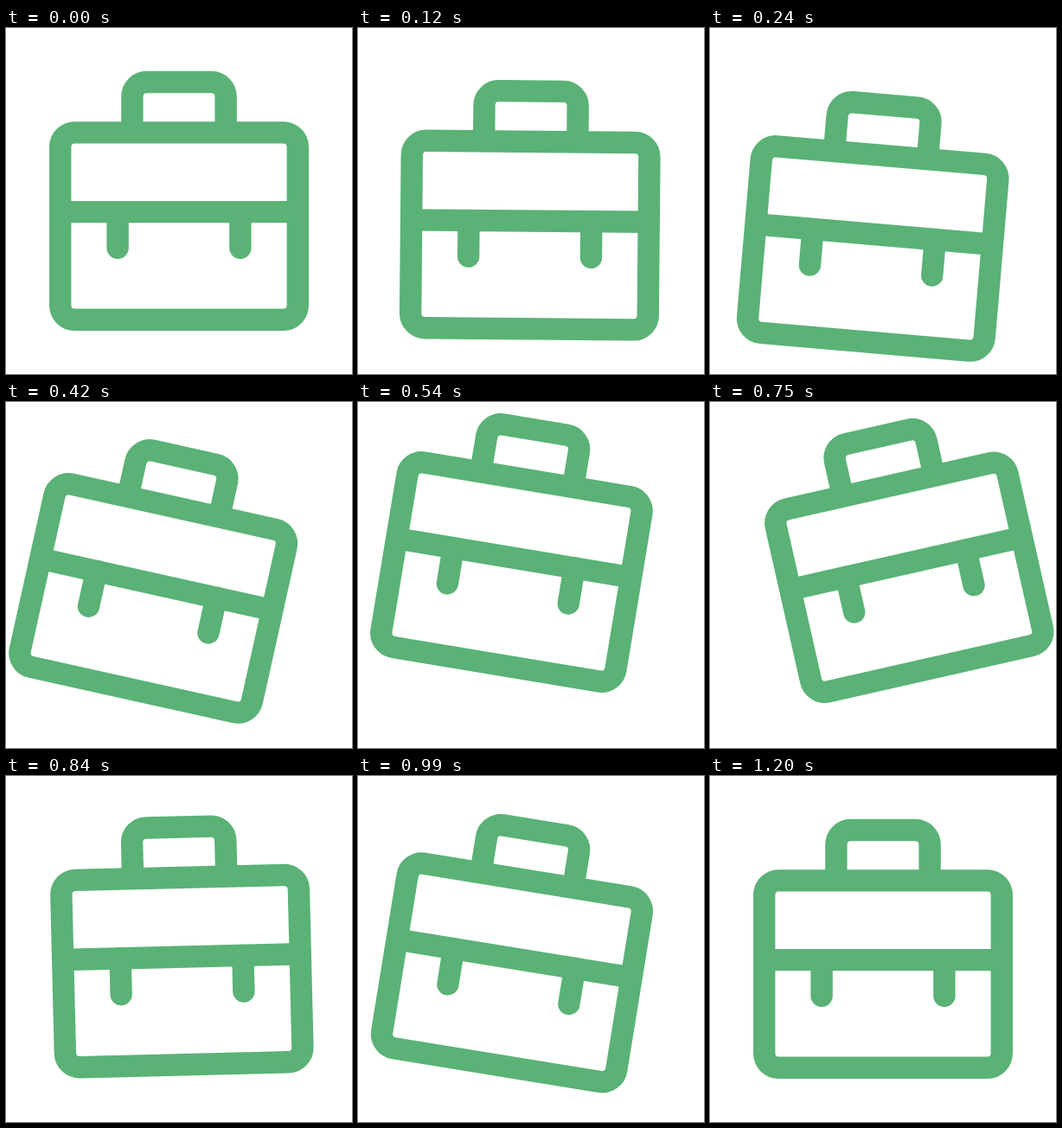
Write an HTML page that moves like this. It is 400 px wide and 400 px high and loops after 3230 ms.

```html
<!DOCTYPE html>
<html lang="en">
<head>
<meta charset="utf-8">
<title>Briefcase</title>
<style>
  html, body { margin: 0; width: 100%; height: 100%; overflow: hidden; background: #fff; }
  svg { display: block; width: 100%; height: 100%; }
</style>
</head>
<body>
<svg viewBox="0 0 400 400">
  <g id="bag" fill="none" stroke="#5ab276" stroke-width="25.4">
    <rect x="62.7" y="120.9" width="274.6" height="216.4" rx="16.7"/>
    <path d="M145.9 120.9V79.2a16.7 16.7 0 0 1 16.7 -16.7H237.4a16.7 16.7 0 0 1 16.7 16.7V120.9"/>
    <path d="M62.7 212.6H337.3"/>
    <path d="M129.1 212.6V254.3M270.9 212.6V254.3" stroke-linecap="round"/>
  </g>
</svg>
<script>
  const LOOP = 3230, STEP = 30, MOVE_END = 1200;
  const PIVOT = "200 91.67";
  const bag = document.getElementById("bag");

  // Keys: time in ms, value, slope per ms (0 when left out)
  const swing = [[72, 0], [480, 13.3], [730, -13.3], [947, 10], [1200, 0]];
  const lift = [[0, 0], [295, 29], [420, 1.1, -0.274], [632, -41.7], [885, 0]];

  // Cubic Hermite curve through the keys, held flat outside them
  function valueAt(keys, t) {
    if (t <= keys[0][0]) return keys[0][1];
    const i = keys.findIndex(key => key[0] > t);
    if (i < 0) return keys[keys.length - 1][1];
    const [t0, v0, m0 = 0] = keys[i - 1];
    const [t1, v1, m1 = 0] = keys[i];
    const span = t1 - t0, u = (t - t0) / span, w = 1 - u;
    return v0 * w * w * (1 + 2 * u) + v1 * u * u * (3 - 2 * u)
      + span * u * w * (m0 * w - m1 * u);
  }

  function draw(time) {
    const t = Math.min(Math.floor(time / STEP) * STEP, MOVE_END);
    const y = valueAt(lift, t).toFixed(3);
    const angle = valueAt(swing, t).toFixed(3);
    bag.setAttribute("transform", `translate(0 ${y}) rotate(${angle} ${PIVOT})`);
  }

  const start = performance.now();
  function tick() {
    draw((performance.now() - start) % LOOP);
    requestAnimationFrame(tick);
  }
  tick();
</script>
</body>
</html>
```
